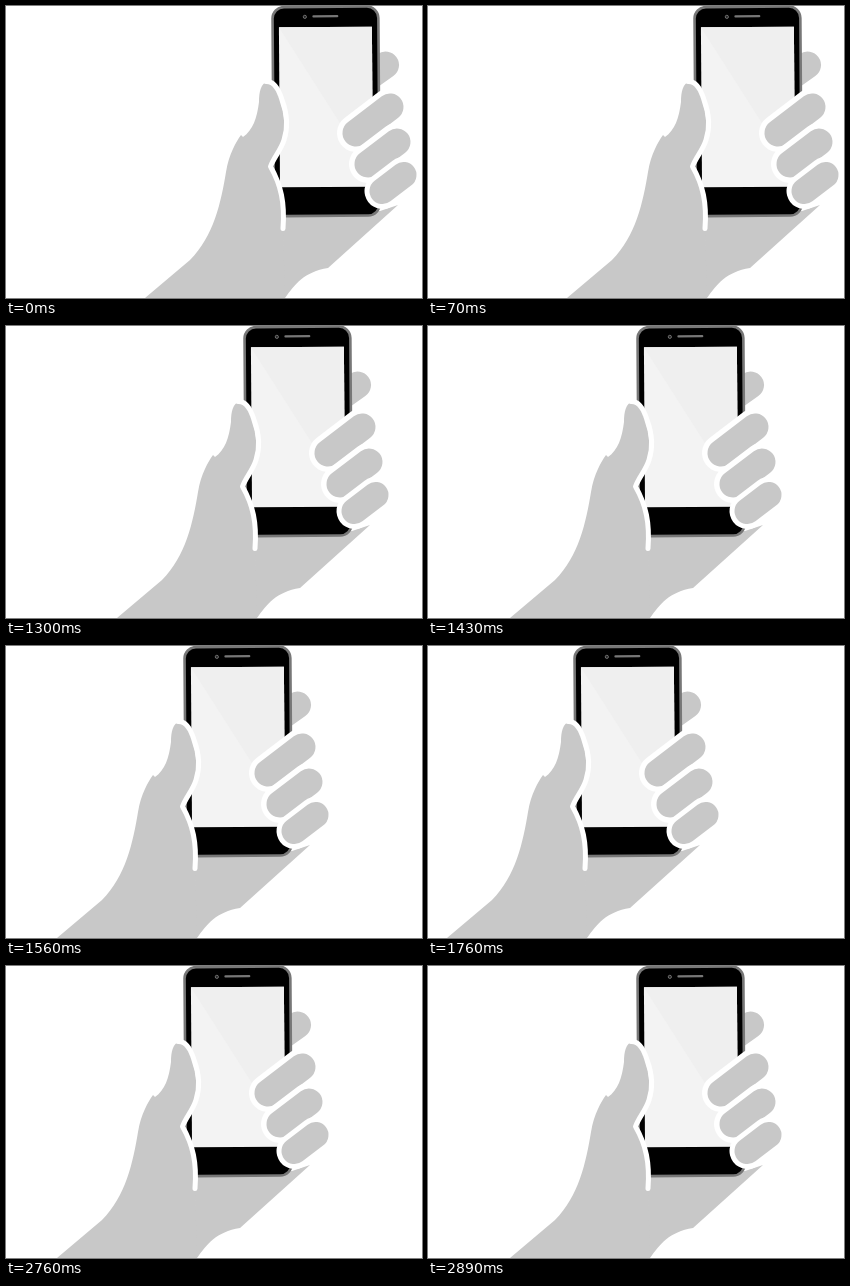
Animation, 416 px wide and 292 px high, one loop 3.02 s. Source, as an HTML page:

```html
<!DOCTYPE html>
<html lang="en">
<head>
<meta charset="utf-8">
<title>Phone check</title>
<style>
  html, body { margin: 0; width: 100%; height: 100%; overflow: hidden; background: #fff; }
  svg { display: block; width: 416px; height: 292px; }
  text { font: bold 12.6px "Open Sans", sans-serif; letter-spacing: .6px; text-anchor: middle; }
  .round { fill: none; stroke-linecap: round; stroke-linejoin: round; }
  .finger { stroke: #c8c8c8; stroke-width: 27; }
  .edge { stroke: #fff; stroke-width: 38; }
</style>
</head>
<body>
<svg viewBox="0 0 416 292">
  <defs>
    <path id="f1" d="M350 127L384 101"/>
    <path id="f2" d="M362 158L391 136"/>
    <path id="f3" d="M376.5 185L397.5 169"/>
    <clipPath id="glare"><path d="M315 47L345 95H360V40H310Z"/></clipPath>
  </defs>
  <g id="scene">
    <path class="round finger" d="M364 70L379.5 59"/>
    <path fill="#c8c8c8" d="M262 200L374 205L392 199L322 262C298 266 289 278 279 292H230Z"/>

    <!-- phone, slightly tilted -->
    <g transform="rotate(-.4 320 105)">
      <rect x="267.2" y=".8" width="105.8" height="209" rx="11.500" stroke="#777" stroke-width="2.6"/>
      <path fill="#f3f3f3" d="M273.500 21H366.500V181H273.500Z"/>
      <path fill="#efefef" d="M273.500 21H366.500V127L337 122Z"/>
      <circle cx="299.500" cy="10.7" r="1.6" fill="#222" stroke="#777" stroke-width=".9"/>
      <rect x="307" y="9.2" width="26" height="2.2" rx="1.1" fill="#777"/>
    </g>

    <g id="badge">
      <circle cx="320.5" cy="71.5" r="24.2" fill="#fff" stroke="#04d672"/>
      <circle cx="320.5" cy="71.5" r="22.8" fill="#04d672"/>
      <circle id="shine" cx="320.5" cy="71.5" r="22.8" fill="#0ae97e" clip-path="url(#glare)"/>
      <path fill="none" stroke="#fff" stroke-width="3.8" d="M309 69L318.5 81L340 49"/>
      <text x="321.3" y="109" fill="#0cd578">VALID</text>
    </g>

    <!-- palm and thumb -->
    <path fill="#c8c8c8" d="M139 292L184 254C208 230 215 196 220 166C223 148 230 136 235 129L237 131C247 124 251 112 253 96C253 86 255 77 261 76C267 76 271 84 274 94C279 110 280 122 276 134C273 144 267 152 264 161C273 176 277 192 277 222L279 292Z"/>
    <path class="round" stroke="#fff" stroke-width="5" d="M260 75.500C268 75 273 84 276 94C282 110 282 122 278 134C275 144 268 151 264.500 160.500C275 179 279 197 277 222.500"/>

    <g class="round">
      <use href="#f1" class="edge"/><use href="#f1" class="finger"/>
      <use href="#f2" class="edge"/><use href="#f2" class="finger"/>
      <use href="#f3" class="edge" style="stroke-width:36"/><use href="#f3" class="finger" style="stroke-width:26"/>
    </g>
  </g>
</svg>
<script>
  const LOOP = 3020;
  // [start in ms, horizontal shift of the hand]
  const steps = [[0, 0], [1300, -28], [1430, -57], [1560, -88], [1690, -120], [2760, -88], [2890, -57]];
  const [scene, badge, shine] = ['scene', 'badge', 'shine'].map(id => document.getElementById(id));
  const show = (el, on) => el.setAttribute('display', on ? 'inline' : 'none');

  function draw(now) {
    const t = now % LOOP;
    const shift = steps.findLast(([start]) => t >= start)[1];
    const first = t >= 700 && t < 1300;
    const second = t >= 2160 && t < 2760;
    scene.setAttribute('transform', `translate(${shift})`);
    badge.setAttribute('transform', second ? 'translate(1 -2)' : '');
    show(badge, first || second);
    show(shine, second);
  }

  const origin = performance.now();
  function tick() {
    draw(performance.now() - origin);
    requestAnimationFrame(tick);
  }
  tick();
</script>
</body>
</html>
```
